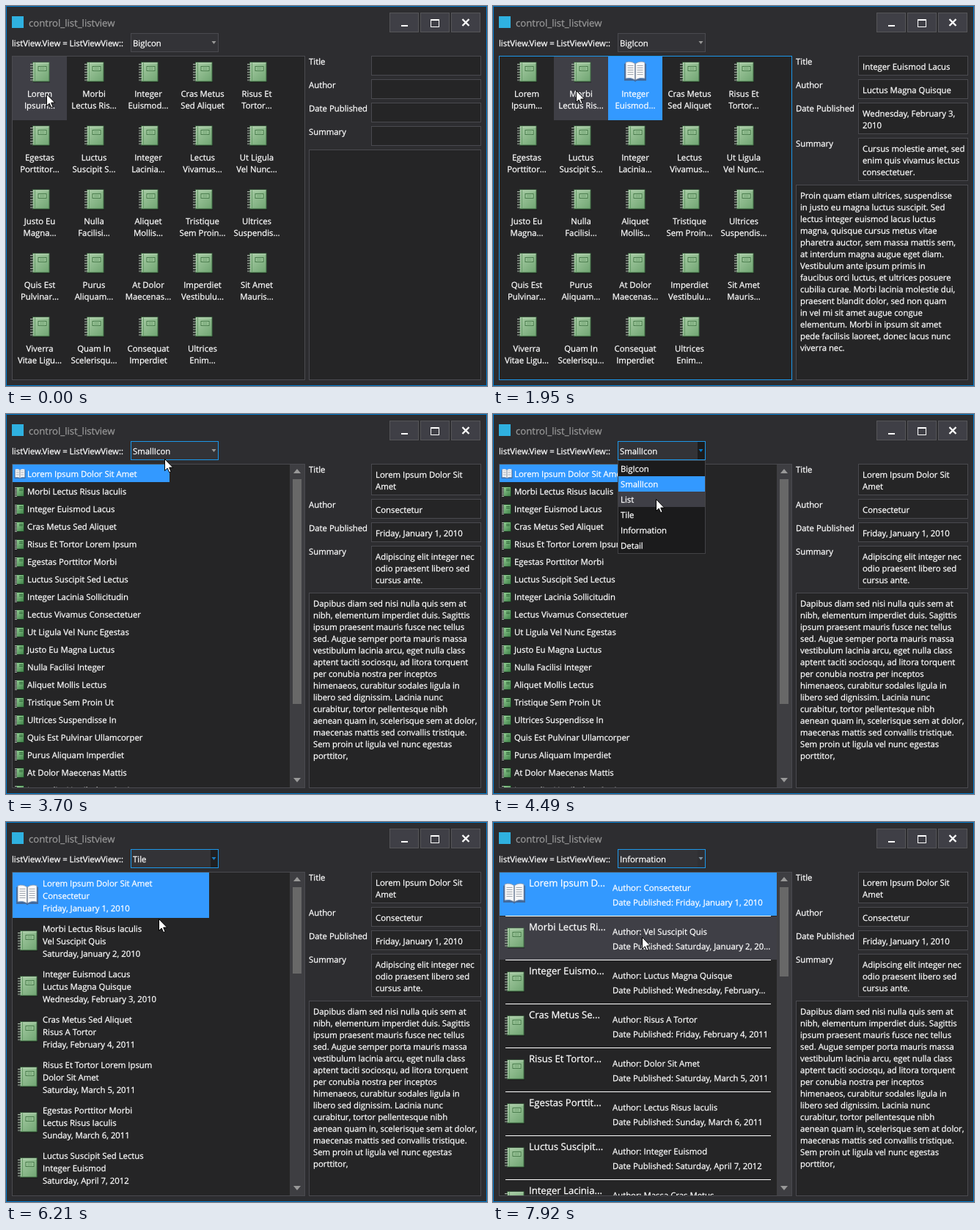
These frames come from a looping animation (656x519 px, 8000 ms). An HTML page with a canvas:

```html
<!DOCTYPE html>
<html lang="la">
<head>
<meta charset="utf-8">
<title>control_list_listview</title>
<style>
html, body { margin: 0; width: 100%; height: 100%; overflow: hidden; background: #2d2d30; }
canvas { display: block; }
</style>
</head>
<body>
<canvas id="stage" width="656" height="519"></canvas>
<script>
const ctx = document.getElementById('stage').getContext('2d');
const LOOP = 8000;
const FACE = '"Open Sans", "Noto Sans", sans-serif';
const SMALL = 11.35, LARGE = 13.15;
const BLUE = '#3399ff', ACCENT = '#007acc', FOCUS = '#1c97ea', PANEL = '#252526';
const EDGE = '#4a4a4f', HOVER = '#3f3f46', TRACK = '#3e3e42', THUMB = '#686868';

// "/" breaks an icon label, "~" is where a label is cut short.
const books = [
  'Lorem/Ipsum~ Dolor Sit Amet', 'Morbi/Lectus Ris~us Iaculis', 'Integer/Euismod~ Lacus',
  'Cras Metus/Sed Aliquet', 'Risus Et/Tortor~ Lorem Ipsum', 'Egestas/Porttitor~ Morbi',
  'Luctus/Suscipit S~ed Lectus', 'Integer/Lacinia~ Sollicitudin', 'Lectus/Vivamus~ Consectetuer',
  'Ut Ligula/Vel Nunc~ Egestas', 'Justo Eu/Magna~ Luctus', 'Nulla/Facilisi~ Integer',
  'Aliquet/Mollis~ Lectus', 'Tristique/Sem Proin~ Ut', 'Ultrices/Suspendis~se In',
  'Quis Est/Pulvinar~ Ullamcorper', 'Purus/Aliquam~ Imperdiet', 'At Dolor/Maecenas~ Mattis',
  'Imperdiet/Vestibulu~m Sapien', 'Sit Amet/Mauris~ Morbi In', 'Viverra/Vitae Ligu~la Nulla',
  'Quam In/Scelerisqu~e Sem', 'Consequat/Imperdiet', 'Ultrices/Enim~ Curabitur'
];
const authors = ['Consectetur', 'Vel Suscipit Quis', 'Luctus Magna Quisque', 'Risus A Tortor',
  'Dolor Sit Amet', 'Lectus Risus Iaculis', 'Integer Euismod', 'Massa Cras Metus'];
const dates = ['Friday, January 1, 2010', 'Saturday, January 2, 20~10', 'Wednesday, February~ 3, 2010',
  'Friday, February 4, 2011', 'Saturday, March 5, 2011', 'Sunday, March 6, 2011',
  'Saturday, April 7, 2012', 'Sunday, April 8, 2012'];
const titleCuts = [13, 15, 14, 13, 15, 15, 15, 15];

const details = [
  ['Lorem Ipsum Dolor Sit\nAmet', 'Consectetur', 'Friday, January 1, 2010',
    'Adipiscing elit integer nec\nodio praesent libero sed\ncursus ante.',
    `Dapibus diam sed nisi nulla quis sem at
nibh, elementum imperdiet duis. Sagittis
ipsum praesent mauris fusce nec tellus
sed. Augue semper porta mauris massa
vestibulum lacinia arcu, eget nulla class
aptent taciti sociosqu, ad litora torquent
per conubia nostra per inceptos
himenaeos, curabitur sodales ligula in
libero sed dignissim. Lacinia nunc
curabitur, tortor pellentesque nibh
aenean quam in, scelerisque sem at dolor,
maecenas mattis sed convallis tristique.
Sem proin ut ligula vel nunc egestas
porttitor,`],
  ['Morbi Lectus Risus Iaculis', 'Vel Suscipit Quis', 'Saturday, January 2, 2010',
    'Luctus non massa fusce\nac turpis quis ligula\nlacinia aliquet mauris.',
    `Ipsum nulla metus metus ullamcorper vel
tincidunt, sed euismod in nibh quisque.
Volutpat condimentum velit class aptent
taciti sociosqu. Ad litora torquent per
conubia nostra per inceptos, himenaeos
nam nec ante sed lacinia urna, non
tincidunt mattis tortor neque adipiscing
diam a cursus, ipsum ante quis turpis
nulla facilisi ut fringilla. Suspendisse
potenti, nunc feugiat mi a tellus
consequat imperdiet, vestibulum sapien
proin quam, etiam ultrices suspendisse in
justo. Eu magna luctus suscipit sed lectus.`],
  ['Integer Euismod Lacus', 'Luctus Magna Quisque', 'Wednesday, February 3,\n2010',
    'Cursus molestie amet, sed\nenim quis vivamus lectus\nconsectetuer.',
    `Proin quam etiam ultrices, suspendisse
in justo eu magna luctus suscipit. Sed
lectus integer euismod lacus luctus
magna, quisque cursus metus vitae
pharetra auctor, sem massa mattis sem,
at interdum magna augue eget diam.
Vestibulum ante ipsum primis in
faucibus orci luctus, et ultrices posuere
cubilia curae. Morbi lacinia molestie dui,
praesent blandit dolor, sed non quam
in vel mi sit amet augue congue
elementum. Morbi in ipsum sit amet
pede facilisis laoreet, donec lacus nunc
viverra nec.`]
];
const views = ['BigIcon', 'SmallIcon', 'List', 'Tile', 'Information', 'Detail'];

// Timeline
const selections = [[0, -1], [510, 0], [1130, 1], [1600, 2], [2150, 0]];
const viewChanges = [[0, 0], [3450, 1], [4500, 2], [6210, 3], [7830, 4]];
const popups = [[2650, 3450], [4000, 4500], [5290, 6210], [7070, 7830]];
const presses = [[6930, 7070]];
const FOCUS_TIME = 2650;
const moves = [ // start, end, x, y
  [70, 190, 49, 117], [790, 950, 130, 112], [1260, 1460, 195, 115], [1820, 2060, 50, 115],
  [2290, 2530, 180, 69], [2530, 2610, 218, 50], [2720, 3270, 217, 95], [3580, 3700, 216, 61],
  [3740, 3860, 222, 50], [4060, 4330, 222, 116], [4780, 5120, 225, 53], [5300, 5660, 208, 132],
  [6300, 6710, 210, 50], [7110, 7560, 203, 157]
];

const latest = (list, t) => list.filter(e => e[0] <= t).pop()[1];
const within = (list, t) => list.some(([a, b]) => t >= a && t < b);
const ease = u => u * u * (3 - 2 * u);
const plain = s => s.replace('/', ' ').replace('~', '');
const clipped = s => s.includes('~') ? s.split('~')[0] + '...' : s;

function cursorAt(t) {
  let x = 55, y = 120;
  for (const [start, end, toX, toY] of moves) {
    if (t < start) break;
    const u = ease(Math.min(1, (t - start) / (end - start)));
    x += (toX - x) * u;
    y += (toY - y) * u;
  }
  return { x: Math.round(x), y: Math.round(y) };
}

// Share of the last 120 ms in which a state held; gives a short colour fade.
function faded(state, t) {
  let sum = 0;
  for (let k = 0; k < 6; k++) sum += state(t - k * 20) ? 1 : 0;
  return sum / 6;
}
function comboHot(t) {
  const c = cursorAt(t);
  return !within(popups, t) && c.x >= 170 && c.x < 290 && c.y >= 37 && c.y < 61;
}
const comboOpen = t => within(popups, t) || within(presses, t);
const blend = (a, b, u) => a.map((v, i) => v + (b[i] - v) * u);
const css = c => `rgb(${c.map(Math.round)})`;

function fill(x, y, w, h, color) {
  ctx.fillStyle = color;
  ctx.fillRect(x, y, w, h);
}
function box(x, y, w, h, color, border) {
  fill(x, y, w, h, border);
  fill(x + 1, y + 1, w - 2, h - 2, color);
}
// A hairline stroke gives the text the weight of hinted screen type.
function text(s, x, y, color = '#fff', size = SMALL, align = 'left') {
  ctx.font = `${size}px ${FACE}`;
  ctx.textAlign = align;
  ctx.fillStyle = ctx.strokeStyle = color;
  ctx.lineWidth = .25;
  ctx.fillText(s, x, y);
  ctx.strokeText(s, x, y);
}
const paragraph = (s, x, y) => s.split('\n').forEach((line, i) => text(line, x, y + i * 16));

function poly(points, color, stroke) {
  ctx.beginPath();
  points.forEach(([x, y]) => ctx.lineTo(x, y));
  ctx.closePath();
  ctx.fillStyle = color;
  ctx.fill();
  if (stroke) { ctx.strokeStyle = stroke; ctx.stroke(); }
}
function arrow(x, y, dx, dy, r, color) {
  poly([[x + dx * r, y + dy * r], [x - dy * r - dx, y + dx * r - dy], [x + dy * r - dx, y - dx * r - dy]], color);
}
function diagonal(x, y, size, from, to) {
  const g = ctx.createLinearGradient(x, y, x + size, y + size);
  g.addColorStop(0, from);
  g.addColorStop(1, to);
  return g;
}

function closedBook() {
  fill(7, 29, 23, 1.5, 'rgba(0,0,0,.4)');
  box(6, 2.5, 23.5, 27, diagonal(6, 3, 24, '#a9cda6', '#71a673'), '#3f6b43');
  fill(7, 3.5, 21.5, 1, '#c4dfc0');
  fill(9, 3.5, 1, 25, '#669a68');
  box(13.5, 8, 12, 7, '#9fc99d', '#487a4b');
  fill(16, 10, 7, 1, '#6d9e6e');
  fill(16, 12, 7, 1, '#6d9e6e');
  for (let y = 5; y < 29; y += 3.6) {
    fill(3, y, 5, 1.1, '#a8b3a8');
    fill(3, y + 1.1, 4, .8, '#455046');
  }
}
function smallClosedBook(x, y) {
  box(x + 3, y + 1, 11, 14, diagonal(x + 3, y + 1, 12, '#9ad69a', '#3b7d45'), '#1c3a22');
  fill(x + 7, y + 4, 5, 1, '#2f6638');
  fill(x + 7, y + 6, 5, 1, '#2f6638');
  for (let k = 2; k < 15; k += 2) fill(x + 1, y + k, 3, 1, '#b4bcb4');
}
function openBook() {
  poly([[1, 5], [4, 4], [4, 25], [28, 25], [28, 4], [31, 5], [31, 28], [18, 28], [16, 29.5], [14, 28], [1, 28]], '#41699c');
  for (const side of [-1, 1]) {
    ctx.beginPath();
    ctx.moveTo(16, 5);
    ctx.quadraticCurveTo(16 + side * 6, .5, 16 + side * 13, 3);
    ctx.lineTo(16 + side * 13, 25);
    ctx.quadraticCurveTo(16 + side * 6, 23, 16, 27);
    ctx.closePath();
    ctx.fillStyle = '#f6f7f8';
    ctx.fill();
    ctx.strokeStyle = '#8294ab';
    ctx.lineWidth = .8;
    ctx.stroke();
    for (let y = 7; y < 22; y += 3) fill(side < 0 ? 5.5 : 18.5, y, 8, 1, '#a2a8b0');
  }
  fill(15.5, 5, 1, 22, '#66778e');
}
function icon(x, y, scale, open) {
  if (scale < 1 && !open) return smallClosedBook(x, y);
  ctx.save();
  ctx.translate(x, y);
  ctx.scale(scale, scale);
  open ? openBook() : closedBook();
  ctx.restore();
}

function itemRect(view, i) {
  switch (view) {
    case 0: return [9 + i % 5 * 74, 69 + Math.floor(i / 5) * 87, 74, 87];
    case 1: return [9, 69 + i * 24, 214, 24];
    case 2: return [9 + Math.floor(i / 17) * 194, 69 + i % 17 * 24, 189, 24];
    case 3: return [9, 69 + i * 62, 268, 62];
    default: return [9, 69 + i * 60, 378, 59];
  }
}
function drawItem(view, i, selected, hovered) {
  const [x, y, w, h] = itemRect(view, i);
  const name = plain(books[i]);
  if (selected || hovered) fill(x, y, w, h, selected ? BLUE : HOVER);
  if (view === 0) {
    icon(x + 21, y + 5, 1, selected);
    clipped(books[i]).split('/').forEach((s, k) => text(s, x + 37, y + 55 + k * 16, '#fff', SMALL, 'center'));
  } else if (view < 3) {
    icon(x + 2, y + 5, .5, selected);
    text(name, x + 20, y + 17);
  } else if (view === 3) {
    icon(x + 4, y + 15, 1, selected);
    [name, authors[i], plain(dates[i])].forEach((s, k) => text(s, x + 41, y + 19 + k * 17));
  } else {
    icon(x + 4, y + 13, 1, selected);
    text(name.slice(0, titleCuts[i]) + '...', x + 40, y + 19, '#fff', LARGE);
    text('Author: ' + authors[i], x + 154, y + 25);
    text('Date Published: ' + clipped(dates[i]), x + 154, y + 45);
    fill(17, y + 59, 362, 1, '#fff');
  }
}
function drawScroll(view) {
  if (view === 2) {
    fill(9, 490, 398, 20, TRACK);
    fill(29, 494, 179, 12, THUMB);
    arrow(20, 499.5, -1, 0, 5, '#999');
    arrow(394, 499.5, 1, 0, 5, '#999');
  } else if (view) {
    fill(387, 69, 20, 441, TRACK);
    fill(391, 89, 12, { 1: 307, 3: 118, 4: 122 }[view], THUMB);
    arrow(397, 80, 0, -1, 5, '#999');
    arrow(397, 498, 0, 1, 5, '#999');
  }
}
function drawList(t, cursor) {
  const view = latest(viewChanges, t), selected = latest(selections, t);
  const focused = t >= 510 && t < FOCUS_TIME;
  box(8, 68, 400, 443, PANEL, focused ? FOCUS : EDGE);
  const settled = !popups.some(([a, b]) => t >= a && t < b + 90);
  ctx.save();
  ctx.beginPath();
  ctx.rect(9, 69, 398, 441);
  ctx.clip();
  const count = view < 3 ? books.length : authors.length;
  for (let i = 0; i < count; i++) {
    const [x, y, w, h] = itemRect(view, i);
    const over = cursor.x >= x && cursor.x < x + w && cursor.y >= y && cursor.y < y + h;
    drawItem(view, i, i === selected, settled && over);
  }
  drawScroll(view);
  ctx.restore();
}

function drawDetails(t) {
  const fields = details[latest(selections, t)] || ['', '', '', '', ''];
  let y = 68;
  ['Title', 'Author', 'Date Published', 'Summary'].forEach((label, i) => {
    const h = 11 + 16 * fields[i].split('\n').length;
    text(label, 413, y + 12);
    box(498, y, 150, h, PANEL, EDGE);
    paragraph(fields[i], 504, y + 19);
    y += h + 5;
  });
  box(413, y, 235, 511 - y, PANEL, EDGE);
  paragraph(fields[4], 419, y + 19);
}

function drawCombo(t, cursor) {
  const hot = faded(comboHot, t), open = faded(comboOpen, t);
  const base = [51, 51, 55], accent = [0, 122, 204];
  box(170, 37, 120, 26, css(blend(base, [63, 63, 70], hot)), t >= FOCUS_TIME ? FOCUS : EDGE);
  fill(279, 38, 10, 24, css(blend(blend(base, accent, hot), [27, 27, 28], open)));
  arrow(283.5, 49, 0, 1, 3, css(blend(blend([153, 153, 153], [255, 255, 255], hot), accent, open)));
  const view = latest(viewChanges, t);
  text(views[view], 173, 55);
  if (!within(popups, t)) return;
  box(170, 63, 120, 128, '#1b1b1c', '#434346');
  views.forEach((name, i) => {
    const y = 64 + i * 21;
    const over = cursor.y >= y && cursor.y < y + 21;
    if (i === view || over) fill(171, y, 118, 21, i === view ? BLUE : HOVER);
    text(name, 174, y + 15);
  });
}

function drawWindow() {
  box(0, 0, 656, 519, '#2d2d30', ACCENT);
  fill(8, 14, 16, 16, '#2fb1e0');
  text('control_list_listview', 31, 28, '#999', LARGE);
  text('listView.View = ListViewView::', 8, 55);
  const face = '#3f3f46';
  for (let x = 523; x < 620; x += 42) box(x, 9, 40, 27, face, '#555558');
  fill(539, 26, 9, 2, '#fff');
  fill(579, 18, 12, 11, '#fff');
  fill(580, 20, 10, 8, face);
  ctx.strokeStyle = '#fff';
  ctx.lineWidth = 2.3;
  ctx.beginPath();
  ctx.moveTo(622.5, 18); ctx.lineTo(631.5, 27);
  ctx.moveTo(631.5, 18); ctx.lineTo(622.5, 27);
  ctx.stroke();
}
function drawCursor({ x, y }) {
  ctx.save();
  ctx.translate(x + .5, y + .5);
  ctx.lineWidth = 1;
  poly([[0, 0], [0, 16], [3.7, 12.6], [6.2, 18.2], [8.6, 17.2], [6.2, 11.6], [11.2, 11.6]], '#fff', '#000');
  ctx.restore();
}

function frame(now) {
  const t = now % LOOP;
  const cursor = cursorAt(t);
  ctx.textRendering = 'geometricPrecision';
  ctx.lineJoin = 'round';
  drawWindow();
  drawList(t, cursor);
  drawDetails(t);
  drawCombo(t, cursor);
  drawCursor(cursor);
}
let origin;
function tick(now) {
  origin ??= now;
  frame(now - origin);
  requestAnimationFrame(tick);
}
frame(0);
requestAnimationFrame(tick);
</script>
</body>
</html>
```
